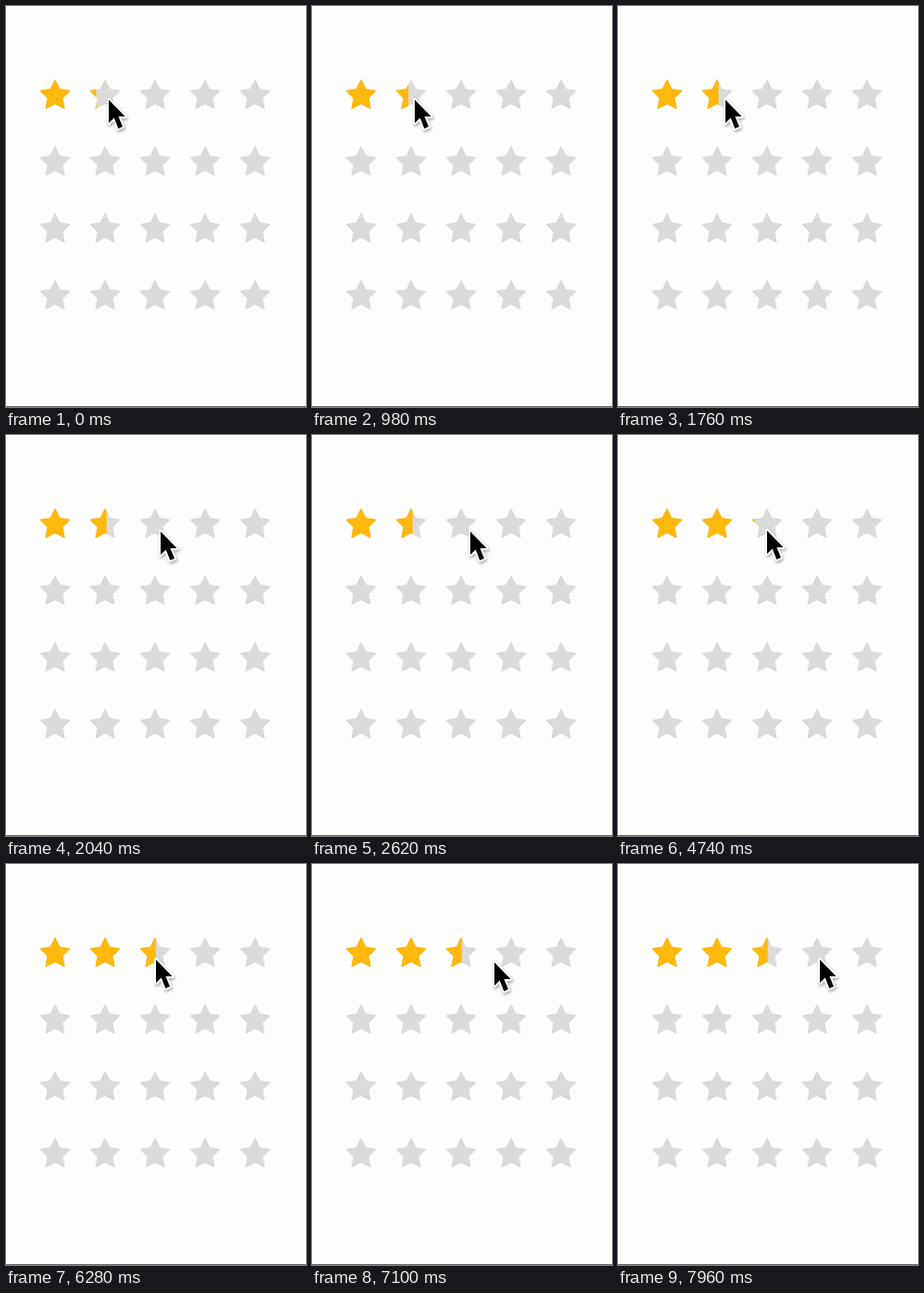
Recreate the animation shown at these times as an HTML page. Size 324x432 px, loop 8000 ms.

```html
<!DOCTYPE html>
<html lang="en">
<head>
<meta charset="utf-8">
<title>Star rating</title>
<style>
  html, body { margin: 0; width: 100%; height: 100%; overflow: hidden; background: #fdfdfc; }
  svg { display: block; width: 100vw; height: 100vh; }
  #cursor { filter: drop-shadow(1px 2px 1.5px rgba(60, 60, 70, .4)); }
</style>
</head>
<body>
<svg viewBox="0 0 324 432">
  <defs>
    <path id="star" stroke-width="1.4" stroke-linejoin="round"
      d="M0-15.5 4.8-5.7 15.5-4 7.8 3.6 9.8 14.7 0 9.6-9.8 14.7-7.8 3.6-15.5-4-4.8-5.7Z"/>
    <clipPath id="rated"><rect id="fill" height="432"/></clipPath>
  </defs>
  <g id="empty" fill="#dadad9" stroke="#dadad9"></g>
  <g id="full" fill="#ffb80c" stroke="#ffb80c" clip-path="url(#rated)"></g>
  <rect y="431" width="324" height="1" fill="#666"/>
  <path id="cursor" stroke="#fff" stroke-width="4" paint-order="stroke" stroke-linejoin="round"
    d="M0 0V25L5.7 19.6 10.3 31 15 29 10.4 18H17.6Z"/>
</svg>
<script>
const LOOP = 8000;
const PITCH = { x: 54, y: 72 };
const FIRST = { x: 53, y: 95.5 };
const STAR_WIDTH = 32;
const $ = id => document.getElementById(id);

// Each move eases from the previous value to a new one.
const pointer = {
  from: [111, 101],
  moves: [
    { start: 1740, duration: 400, to: [171, 104] },
    { start: 3580, duration: 160, to: [161, 103] },
    { start: 6260, duration: 840, to: [197, 106] },
    { start: 7100, duration: 860, to: [218, 103] }
  ]
};
const rating = {
  from: [1.2],
  moves: [
    { start: 800, duration: 440, to: [1.55] },
    { start: 4420, duration: 320, to: [2.08] },
    { start: 4820, duration: 200, to: [2.52] }
  ]
};

function valueAt({ from, moves }, time) {
  return moves.reduce((value, { start, duration, to }) => {
    const p = Math.min(1, Math.max(0, (time - start) / duration));
    const eased = Math.sin(p * Math.PI / 2);
    return value.map((v, i) => v + (to[i] - v) * eased);
  }, from);
}

function starRow(row) {
  return Array.from({ length: 5 }, (_, i) =>
    `<use href="#star" x="${FIRST.x + i * PITCH.x}" y="${FIRST.y + row * PITCH.y}"/>`).join("");
}

$("empty").innerHTML = [0, 1, 2, 3].map(starRow).join("");
$("full").innerHTML = starRow(0);

function draw(time) {
  const [stars] = valueAt(rating, time);
  const whole = Math.floor(stars);
  const left = FIRST.x - STAR_WIDTH / 2 + whole * PITCH.x;
  $("fill").setAttribute("width", left + (stars - whole) * STAR_WIDTH);
  $("cursor").setAttribute("transform", `translate(${valueAt(pointer, time).map(Math.round)})`);
}

const begin = performance.now();
function tick() {
  draw((performance.now() - begin) % LOOP);
  requestAnimationFrame(tick);
}
tick();
</script>
</body>
</html>
```
